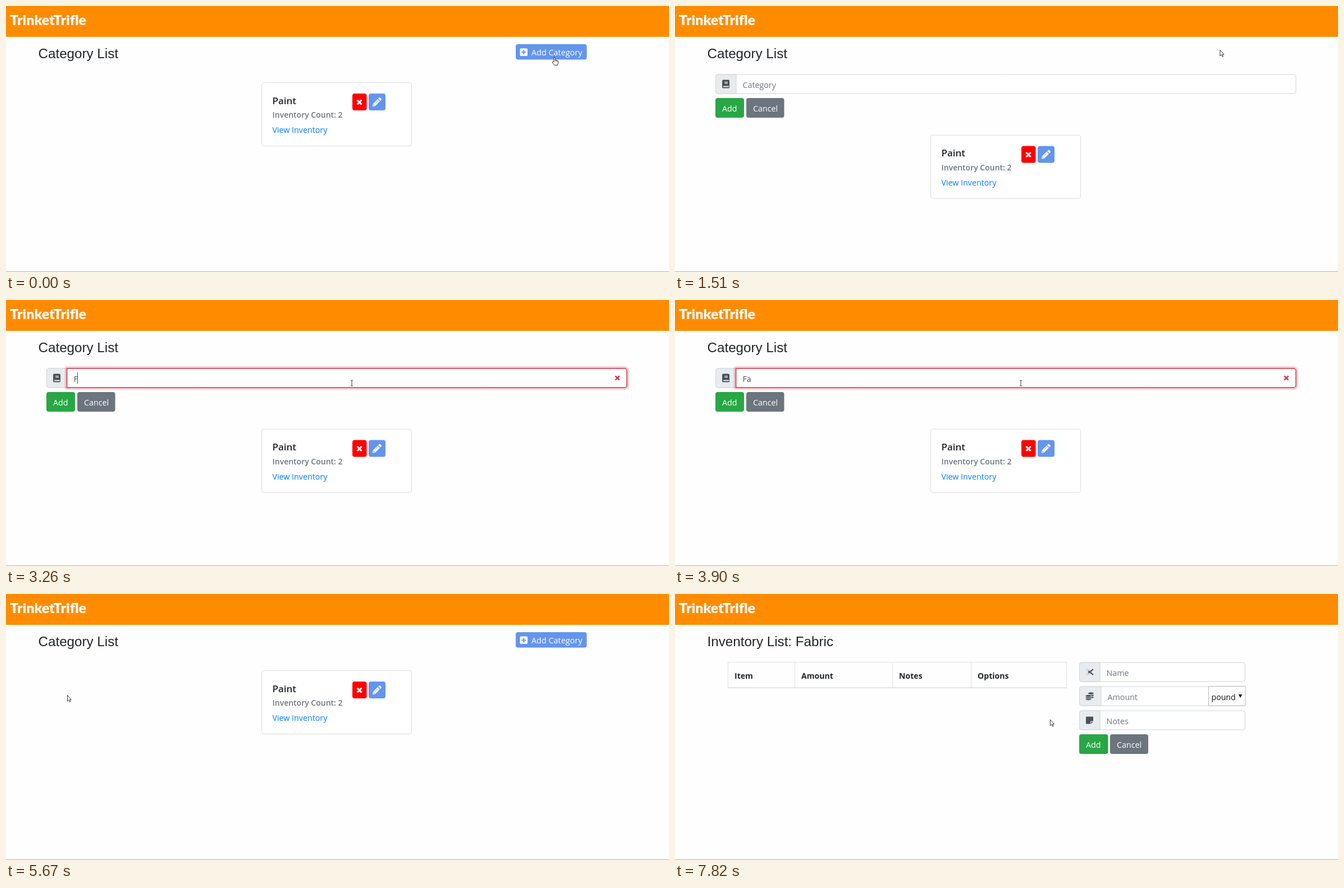
An HTML page with a canvas for the animation above (8 s loop, 1181 px wide and 474 px high).

```html
<!DOCTYPE html>
<html lang="en">
<head>
<meta charset="utf-8">
<title>Category list</title>
<style>
html, body { margin: 0; width: 100%; height: 100%; overflow: hidden; background: #fefefe; }
canvas { display: block; }
</style>
</head>
<body>
<canvas id="stage" width="1181" height="474"></canvas>
<script>
const ctx = document.getElementById('stage').getContext('2d');
const LOOP = 8000;
const UI = '"Open Sans", "Noto Sans", sans-serif';
const INK = '#212529', GRAY = '#6c757d', DARK = '#495057', EDGE = '#ced4da', PALE = '#e9ecef';
const BLUE = '#6495ed', GREEN = '#28a745', RED = '#dc3545', PAGE = '#fefefe';

// Step tables: each row starts with the time at which it takes effect.
const POINTER = [
  [0, 'hand', 977, 91], [250, 'hand', 976, 81], [400, 'hand', 975, 74],
  [670, 'hand', 972, 76], [950, 'hand', 970, 78], [1510, 'arrow', 970.5, 78],
  [1650, 'arrow', 742, 134], [1780, 'arrow', 616, 162],
  [2210, 'beam', 616, 153], [2330, 'beam', 616, 148],
  [4880, 'beam', 560, 148], [5000, 'beam', 386, 151], [5120, 'arrow', 229, 158],
  [5240, 'hand', 128, 182], [5390, 'hand', 112, 181], [5520, 'hand', 109, 180],
  [5670, 'arrow', 109, 180], [6100, 'arrow', 260, 191], [6230, 'arrow', 520, 203],
  [6350, 'arrow', 694, 207], [6500, 'arrow', 724, 174], [6780, 'arrow', 760, 172.5],
  [6910, 'hand', 788, 172], [7050, 'arrow', 752, 190], [7170, 'arrow', 694, 214],
  [7290, 'hand', 668, 224], [7820, 'arrow', 668, 223.5]
];
const TYPED = [[0, ''], [3140, 'F'], [3380, 'Fa'], [4150, 'Fab'], [4300, 'Fabr'], [4450, 'Fabri'], [4580, 'Fabric']];
const CARET = [[0, false], [2610, true], [3900, false], [4150, true], [5100, false]];
// time, border, glow, glow width, mark
const FOCUS = [
  [0], [2610, '#9cc8fa', 'rgba(0,123,255,.17)', 2], [2740, '#80bdff', 'rgba(0,123,255,.25)', 3],
  [3140, '#b5779a', 'rgba(120,85,155,.25)', 3, 'cross'], [3260, RED, 'rgba(220,53,69,.25)', 3, 'cross'],
  [4150, '#826e45', 'rgba(130,110,69,.25)', 3, 'check'], [4300, GREEN, 'rgba(40,167,69,.25)', 3, 'check']
];
const ADD_FILL = [[0, GREEN], [5390, '#259a40'], [5520, '#218838']];

const at = (table, t) => table.filter(row => row[0] <= t).pop();

function text(str, x, y, color = INK, size = 14.25, weight = 400, family = UI) {
  ctx.font = `${weight} ${size}px ${family}`;
  ctx.fillStyle = color;
  ctx.fillText(str, x, y);
}

function box(x, y, w, h, radius, fill, stroke, line = 1) {
  ctx.beginPath();
  ctx.roundRect(x, y, w, h, radius);
  if (fill) { ctx.fillStyle = fill; ctx.fill(); }
  if (stroke) { ctx.strokeStyle = stroke; ctx.lineWidth = line; ctx.stroke(); }
}

function line(points, color, width = 1) {
  ctx.beginPath();
  points.forEach(([x, y]) => ctx.lineTo(x, y));
  ctx.strokeStyle = color;
  ctx.lineWidth = width;
  ctx.stroke();
}

function shape(path, x, y, fill, stroke, width = 1) {
  ctx.save();
  ctx.translate(x, y);
  const p = new Path2D(path);
  if (fill) { ctx.fillStyle = fill; ctx.fill(p); }
  if (stroke) { ctx.strokeStyle = stroke; ctx.lineWidth = width; ctx.stroke(p); }
  ctx.restore();
}

const cross = (x, y, color, r, width) =>
  shape(`M${-r} ${-r}L${r} ${r}M${r} ${-r}L${-r} ${r}`, x, y, null, color, width);

const icons = {
  book(x, y) {
    box(x - 6.5, y - 7.5, 13, 15, 2, DARK);
    shape('M-2.5 -4h6v1.1h-6zM-2.5 -1.9h6v1.1h-6zM-4.5 3.6h10v1.9h-10z', x, y, PALE);
  },
  scissors(x, y) {
    shape('M-2.6 -2.4L6.3 4.8M-2.6 2.4L6.3 -4.8', x, y, null, DARK, 2.3);
    for (const dy of [-3.7, 3.7]) {
      ctx.beginPath();
      ctx.arc(x - 4, y + dy, 1.9, 0, 7);
      ctx.lineWidth = 1.7;
      ctx.stroke();
    }
  },
  coins(x, y) {
    const disc = (cx, cy) => {
      ctx.beginPath();
      ctx.ellipse(cx, cy, 5.4, 2.2, 0, 0, 7);
      ctx.fillStyle = DARK;
      ctx.fill();
      ctx.strokeStyle = PALE;
      ctx.lineWidth = .9;
      ctx.stroke();
    };
    for (const dy of [2, -1.6, -5]) disc(x + 2.4, y + dy);
    for (const dy of [5.3, 2.6, -.4]) disc(x - 2, y + dy);
  },
  note(x, y) {
    shape('M-5.5 -6.5H5.5Q6.5 -6.5 6.5 -5.5V1.6H2.4Q1.6 1.6 1.6 2.4V6.5H-5.5Q-6.5 6.5 -6.5 5.5V-5.5Q-6.5 -6.5 -5.5 -6.5ZM2.7 2.7H6.3L2.7 6.3Z', x, y, DARK);
  },
  pencil(x, y) {
    shape('M15.5 4.5L13.9 6 10 2.1 11.5 .5Q12.6 -.5 13.7 .5L15.5 2.3Q16.5 3.4 15.5 4.5ZM9 3.1L.7 11.4 0 15.2Q0 16 .8 16L4.7 15.3 12.9 7.1Z', x - 8, y - 8, '#fff');
    shape('M4.6 10.3L9 5.9M1.9 12.4V14.1H3.6', x - 8, y - 8, null, BLUE, .9);
  }
};

const pointers = {
  arrow: (x, y) => shape('M.4 .4V11L2.8 8.8 4.5 12.4 6.1 11.7 4.5 8.2H7.4Z', x, y, '#fff', '#222', .9),
  hand: (x, y) => {
    shape('M-1.2 9V1.4Q-1.2 .4 0 .4 1.2 .4 1.2 1.4V5.6L5 6.3Q6.9 6.7 6.8 8.4L6.4 11.2 5.4 14.4H-.2L-3.6 9.9Q-3.9 8 -2.3 8.3Z', x, y, '#fff', '#222', .95);
    shape('M1.2 5.6V8.4M3.2 6V8.4M5 6.4V8.6', x, y, null, '#444', .7);
  },
  beam: (x, y) => shape('M-2 -5H-.6L0 -4.4 .6 -5H2M0 -4.4V4.4M-2 5H-.6L0 4.4 .6 5H2', x, y, null, '#333', 1)
};

function button(label, x, y, w, fill) {
  box(x, y, w, 35, 4, fill);
  text(label, x + 12, y + 24, '#fff');
}

function field(icon, x, y, w, prepend, hint) {
  box(x + .5, y + .5, w - 1, 34, 4, '#fff', EDGE);
  box(x + .5, y + .5, prepend, 34, [4, 0, 0, 4], PALE, EDGE);
  icons[icon](x + 18.5, y + 17.5);
  text(hint, x + prepend + 12, y + 24, GRAY);
}

function card(name, count, x, y, hover) {
  box(x + .5, y + .5, 267, 113, 4, '#fff', '#dcdcdc');
  text(name, x + 19.5, y + 38.5, INK, 17, 600);
  text('Inventory Count: ' + count, x + 19.5, y + 63, GRAY, 14, 600);
  text('View Inventory', x + 19.5, y + 90, hover ? '#0056b3' : '#007bff');
  if (hover) box(x + 19.5, y + 92, 97.5, 1, 0, '#0056b3');
  box(x + 162, y + 20, 25.5, 30, 4, '#f00');
  cross(x + 174.5, y + 35.5, '#fff', 4, 3.1);
  box(x + 191, y + 20, 30, 30, 4, BLUE);
  icons.pencil(x + 206, y + 35);
}

function addCategoryButton() {
  box(908, 68, 126.5, 27.5, 4, BLUE);
  box(915.5, 75.5, 13.5, 13.5, 2, '#fff');
  shape('M-4 0H4M0 -4V4', 922.25, 82.25, null, BLUE, 2.1);
  text('Add Category', 936, 88, '#fff', 14.4);
}

function suggestions() {
  ctx.save();
  ctx.shadowColor = 'rgba(0,0,0,.35)';
  ctx.shadowBlur = 3;
  ctx.shadowOffsetY = 1;
  box(108, 157, 179, 149, [0, 0, 3, 3], '#fff');
  ctx.restore();
  ['adsfasdfadf', 'Glitter', 'Water Bottles', 'Buttons'].forEach((word, i) =>
    text(word, 119.5, 185.7 + i * 33.6, '#1c1c1c', 11.8, 500));
}

function categoryForm(t) {
  const typed = at(TYPED, t)[1];
  const [, border, glow, glowWidth, mark] = at(FOCUS, t);
  field('book', 72, 121.5, 1034.5, 36.5, typed ? '' : 'Category');
  if (border) {
    const gap = .7 + glowWidth / 2;
    box(108.5 - gap, 122 - gap, 997.5 + 2 * gap, 34 + 2 * gap, [2, 6, 6, 2], null, glow, glowWidth);
    box(108.5, 122, 997.5, 34, [0, 4, 4, 0], null, border, 1.5);
  }
  text(typed, 120.5, 145.5, DARK);
  if (at(CARET, t)[1]) {
    const end = 120 + ctx.measureText(typed).width;
    box(Math.round(end), 129, 1, 20, 0, DARK);
  }
  if (mark === 'cross') cross(1089, 139, RED, 3.7, 2.6);
  if (mark === 'check') shape('M-6.4 .6L-2.3 4.6 6.4 -4.4', 1088.5, 139, null, GREEN, 3);
  button('Add', 72, 164, 51, at(ADD_FILL, t)[1]);
  button('Cancel', 127, 164, 67.5, GRAY);
  if (t >= 2610 && t < 3140) suggestions();
}

function inventoryPage() {
  const columns = [94.5, 213.5, 387.5, 527.5, 697.5];
  const rule = '#dee2e6';
  columns.forEach(x => line([[x, 121], [x, 168]], rule));
  line([[94, 121.5], [698, 121.5]], rule);
  line([[94, 167.2], [698, 167.2]], rule, 1.7);
  ['Item', 'Amount', 'Notes', 'Options'].forEach((label, i) =>
    text(label, columns[i] + 11.5, 150.5, INK, 14.1, 700));
  field('scissors', 720, 121.5, 296, 36.5, 'Name');
  field('coins', 720, 164.5, 296, 38.5, 'Amount');
  field('note', 720, 207.5, 296, 36.5, 'Notes');
  box(950.5, 164.5, 65.5, 34.5, 0, '#fff', '#b4b4b4');
  text('pound', 955.5, 188.5, '#111', 14.1);
  shape('M-3.3 -3H3.3L0 3Z', 1007, 182, '#111');
  button('Add', 720, 250, 51.5, GREEN);
  button('Cancel', 775, 250, 68, GRAY);
}

function categoryPage(t) {
  const formOpen = t >= 1510 && t < 5670;
  if (formOpen) categoryForm(t);
  else addCategoryButton();
  if (t < 5980) {
    card('Paint', 2, 455, formOpen ? 229.5 : 136);
  } else {
    card('Paint', 2, 306, 136);
    card('Fabric', '', 604, 136, t >= 7290);
  }
}

function draw(t) {
  box(0, 0, 1181, 474, 0, PAGE);
  box(0, 0, 1181, 55, 0, '#ff8c00');
  box(0, 473, 1181, 1, 0, '#b0b0b0');
  ctx.lineJoin = 'round';
  text('TrinketTrifle', 7, 34, '#fff', 25, 900, 'Lato, sans-serif');
  const inventory = t >= 7820;
  text(inventory ? 'Inventory List: Fabric' : 'Category List', 57.5, 92.5, INK, 24.2, 400, '"Liberation Sans", Arial, sans-serif');
  if (inventory) inventoryPage();
  else categoryPage(t);
  const [, kind, x, y] = at(POINTER, t);
  pointers[kind](x, y);
}

const start = performance.now();
function tick() {
  draw((performance.now() - start) % LOOP);
  requestAnimationFrame(tick);
}
tick();
</script>
</body>
</html>
```
